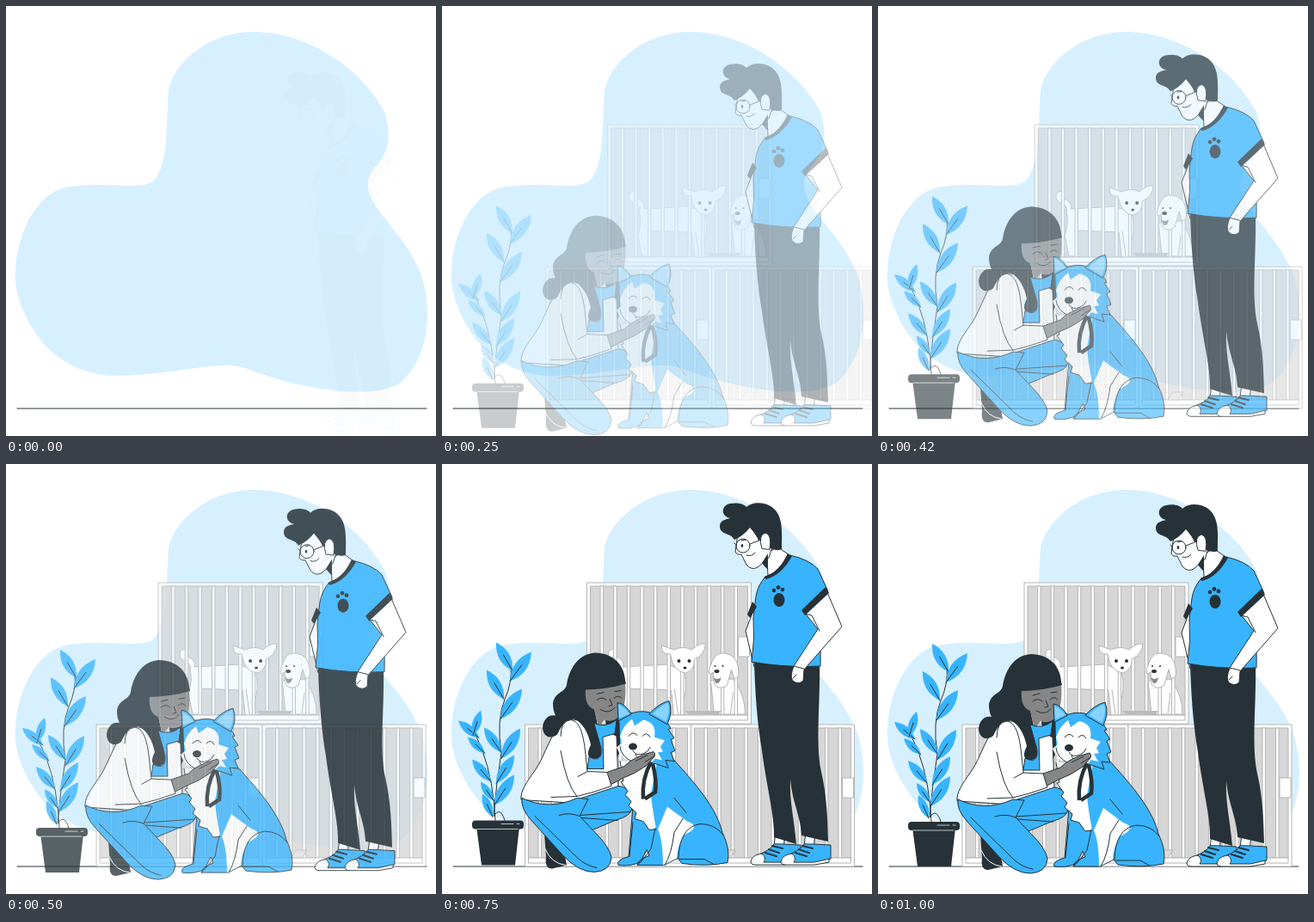
These frames come from a looping animation (500x500 px, 1.04 s). An HTML page:

```html
<!DOCTYPE html>
<html lang="en">
<head>
<meta charset="utf-8">
<title>Dog adoption</title>
<style>
html, body { margin: 0; width: 100%; height: 100%; overflow: hidden; background: #fff; }
svg { display: block; width: 100vw; height: 100vh; }
.ink { stroke: #263238; stroke-width: 1; stroke-linejoin: round; stroke-linecap: round; }
.grey { stroke: #b5b5b5; stroke-width: 1; stroke-linejoin: round; }
.dark { fill: #263238; }
.blue { fill: #38b4ff; }
.pale { fill: #88d2ff; }
.white { fill: #fff; }
.skin { fill: #868686; }
.none { fill: none; }
</style>
</head>
<body>
<svg viewBox="0 0 500 500">
  <path fill="#d7f0ff" d="M189 97C197 62 240 29 291 30C350 31 413 71 441 125C446 146 446 158 441 169C434 187 419 192 421 211C424 238 462 262 482 310C496 350 493 405 462 435C436 460 350 447 291 426C277 421 270 417 252 418C215 420 172 430 128 430C90 430 59 412 40 388C20 362 8 330 11 305C13 270 30 229 58 215C77 206 110 208 140 209C155 209 169 209 175 199C189 177 186 140 189 97Z"/>
  <path class="ink" d="M13 468H489"/>

  <g id="cages">
    <g id="topCage"></g>
    <g id="bottomCages"></g>
  </g>

  <g id="plant">
    <g id="leaves"></g>
    <path class="dark" d="M40 423H90L85 468H46Z"/>
    <rect class="dark" x="35" y="416" width="60" height="10" rx="4"/>
    <path class="none" stroke="#fff" stroke-width=".7" stroke-linecap="round" d="M41 426H88M69 420H83M87 420H90"/>
  </g>

  <g id="man">
    <path class="white ink" d="M363 170L353 196L363 238L376 236V170Z"/>
    <g id="shoe">
      <path class="white ink" d="M388 430L386 446L397 450L399 430Z"/>
      <path class="blue ink" d="M386 444C380 455 363 454 359 465L400 467L417 461L417 445L398 444Z"/>
      <path class="white ink" d="M372 455C364 456 360 459 359 465Q360 468 364 468H398L415 465V461L398 465H374Q378 460 372 455Z"/>
      <path class="none" stroke="#263238" stroke-width="2" stroke-linecap="round" d="M376 454L389 458M380 450L392 454M384 446L396 449"/>
    </g>
    <use href="#shoe" x="35" y="0"/>
    <path class="dark" d="M363 232H439C440 285 434 325 441 360C448 390 448 415 449 441L418 434C417 410 407 395 405 368C404 395 409 410 412 444L386 436C387 412 377 375 372 335C366 300 364 265 363 232Z"/>
    <path class="white ink" d="M378 107L379 132Q390 128 404 108L390 98Z"/>
    <path class="blue ink" d="M376 133Q394 130 405 108Q427 113 437 124L449 150L422 175L437 188Q441 211 440 237Q399 239 360 232Q364 205 362 180L365 156Q367 143 376 133Z"/>
    <path class="white ink" d="M422 175L437 194L409 237Q404 250 408 254Q414 259 420 254L421 241L465 191L447 149Z"/>
    <path class="none ink" d="M409 237L421 240M408 251L412 247"/>
    <path class="dark" d="M374 134L379 131Q392 127 402 106L407 109Q395 131 377 136ZM446 145L450 152L422 178L418 172ZM361 162L366 168L358 181L355 177Z"/>
    <path class="none ink" d="M422 176L430 178L439 196"/>
    <ellipse class="dark" cx="392" cy="160" rx="6.5" ry="8"/>
    <g class="dark"><circle cx="386" cy="149" r="2.300"/><circle cx="391" cy="145.500" r="2.400"/><circle cx="396" cy="148" r="2.400"/></g>
    <path class="white ink" d="M355 70L344 84L341 104Q343 108 348 107L354 119Q360 126 367 122L380 111L385 95L382 72Z"/>
    <path class="dark" d="M340 90C335 81 323 85 323 74C323 67 332 66 335 65C324 63 324 50 335 48C345 46 352 49 354 52C362 44 380 46 388 56C397 67 395 85 395 101C392 103 384 102 380 99L381 86Q374 81 371 90L368 91Q366 85 358 76Q350 86 340 90ZM379 106L379 125Q374 120 372 117Z"/>
    <path class="white ink" d="M372 100Q367 85 376 82Q384 84 381 101Z"/>
    <circle class="none ink" cx="350" cy="97" r="8"/>
    <path class="none ink" d="M358 95L371 90M342 96L340 94M354 108Q360 110 364 105M348 91L353 90"/>
    <ellipse class="dark" cx="349" cy="97" rx="1.300" ry="2"/>
  </g>

  <g id="friends">
    <path class="dark" d="M203 270Q212 280 210 300Q213 325 204 342L196 345L190 300Z"/>
    <path class="white ink" d="M146 298C126 310 121 340 108 358C98 372 91 382 92 392L156 396L205 378L203 318L175 302Z"/>
    <path class="blue ink" d="M150 394L205 376Q221 377 221 402Q220 411 201 416L168 430L150 421Z"/>
    <path class="none ink" d="M160 410L219 406M162 413L204 416"/>
    <path class="dark" d="M119 431Q128 428 141 446L145 468L128 472Q119 472 121 458Z"/>
    <path class="none" stroke="#fff" stroke-width="1" d="M120 449Q127 466 144 468"/>
    <path class="blue ink" d="M93 390Q91 402 104 416L141 457Q159 476 177 476Q196 475 197 459Q195 447 178 430L160 411L170 391L157 390Q124 405 93 390Z"/>
    <path class="none ink" d="M108 411L158 460Q168 469 180 471M160 411Q148 406 136 410"/>
    <path class="dark" d="M213 257C214 235 198 221 178 221C158 222 148 240 145 258C143 268 131 266 129 280Q129 288 132 294C122 292 117 301 117 309C119 322 129 320 134 316Q142 298 154 298Q168 305 173 328Q166 342 175 344Q187 345 185 333L180 300L172 263Z"/>
    <path class="skin" d="M167 262L213 256Q215 281 207 294Q199 303 189 299L182 308L177 287Q165 283 167 262Z"/>
    <path class="dark" d="M165 264Q190 264 214 257L211 245L170 244Z"/>
    <path class="none ink" d="M180 276Q186 271 191 276M200 274Q205 269 209 274M184 287Q194 293 201 285M195 275L198 282L194 283M180 269L188 267M201 266L208 265"/>
    <path class="blue ink" d="M177 303Q190 309 203 299L201 315L187 319L188 356H169L171 342Q187 350 185 332Z"/>

    <path class="blue ink" d="M225 345L263 338C280 358 318 395 326 430C333 445 334 455 332 465Q308 470 279 466L274 460L258 468H227Q228 461 241 457L238 450L231 464Q220 470 205 468Q202 462 217 458L222 400Z"/>
    <path class="white" d="M262 400L285 417Q303 423 281 433Q273 448 273 460L257 468Q257 440 251 426Z"/>
    <path class="white" d="M207 347L211 370L208 371L216 382L213 386L220 394L217 399L226 407L224 414L234 417L241 427L249 426Q244 400 243 385L250 348Z"/>
    <path class="none ink" d="M207 347L211 370L208 371L216 382L213 386L220 394L217 399L226 407L224 414L234 417L241 427L249 426M248 425L243 449Q234 462 227 468M222 418L218 458M259 468Q267 455 270 430L280 414M275 460Q276 424 300 420Q318 420 327 433M276 461H305L316 467M270 390L284 407"/>
    <path class="blue ink" d="M206 296Q214 290 222 291Q234 287 246 292Q260 296 266 309L263 310L270 320L266 322L271 335L266 337L270 347L260 346L263 355L248 350L215 346L207 335Z"/>
    <path class="blue ink" d="M205 300L204 279Q213 280 220 292ZM241 292Q252 280 264 277Q269 290 262 304Z"/>
    <path class="pale" d="M206 297L205 281Q212 284 218 292ZM245 292Q254 282 263 279Q266 290 260 301Z"/>
    <path class="white" d="M203 331L209 326L207 318Q211 305 221 298L224 306L234 299Q250 302 247 319L259 323L254 330L257 336L251 337L256 346L248 344L240 352L222 349Q208 345 203 331Z"/>
    <path class="none ink" d="M217 318Q222 311 227 317M233 318Q238 312 242 319M222 335Q226 342 235 338Q240 336 242 331M207 330Q208 342 222 348M225 339Q227 346 234 345"/>
    <ellipse class="dark" cx="222" cy="330" rx="5" ry="4"/>
    <path class="none" stroke="#263238" stroke-width="4.500" d="M243 348Q232 368 234 391M245 350Q250 370 248 383L236 391"/>

    <path class="skin ink" d="M192 360L212 353Q222 342 246 336Q250 340 244 345L238 352Q224 362 210 367L195 375Z"/>
    <path class="none ink" d="M247 341L236 348M239 340L225 347"/>
    <path class="white ink" d="M138 318Q138 300 150 299C166 302 166 335 169 359L192 360L197 376Q175 384 157 388Q145 375 138 335"/>
    <path class="none ink" d="M158 365L169 359M157 388L127 389"/>
  </g>
</svg>
<script>
const el = id => document.getElementById(id);
const rect = (x, y, w, h, fill = '#fff') =>
  `<rect class="grey" x="${x}" y="${y}" width="${w}" height="${h}" fill="${fill}"/>`;

function cage(x, y, w, h, pets = '', heads = '') {
  let bars = '';
  for (let i = 1; i < 12; i++) bars += rect(x + i * 15.6, y + 4, 3.4, h - 14);
  return rect(x, y, w, h) + rect(x + 4, y + 4, w - 8, h - 14, '#d6d6d6') +
    pets + bars + heads + rect(x + 4, y + h - 10, w - 8, 6);
}
const latch = (x, y) => rect(x, y, 13, 23);

const petBodies = `<g class="grey white">
  <path d="M207 239C210 227 193 232 195 220Q196 214 203 216Q199 222 208 226Q214 231 212 236L263 233L283 240Q288 264 281 277L279 292H271L268 263L218 261L219 291H210L205 267Q210 252 207 239Z"/>
  <path d="M314 252L340 250Q354 268 354 291H318Z"/></g>
  <path class="grey none" d="M272 262L276 291M327 264V288M340 266L337 290"/>`;
const petHeads = `<g class="grey white">
  <path d="M267 221Q256 222 257 211L271 216Q282 211 292 216Q300 208 308 209Q307 222 295 227Q296 239 285 243Q270 242 267 221Z"/>
  <path d="M316 229Q320 219 330 220Q344 222 346 237Q348 251 341 249L338 239L333 257Q324 264 318 256L317 242Q310 248 313 236Z"/></g>
  <g class="dark"><circle cx="277" cy="229" r="2"/><circle cx="289" cy="229" r="2"/>
  <ellipse cx="284" cy="237" rx="2" ry="1.500"/><ellipse cx="321" cy="241" rx="3" ry="2"/>
  <circle cx="319" cy="235" r="1"/><circle cx="328" cy="235" r="1"/></g>
  <path fill="#888" d="M317 248Q322 252 326 248Q325 256 320 255Z"/>
  <path fill="#bbb" d="M284 287H326L323 291H288Z"/>`;

el('topCage').innerHTML = cage(170, 138, 191, 164, petBodies, petHeads) + latch(346, 201);
el('bottomCages').innerHTML = cage(98, 303, 193, 165) + cage(291, 303, 190, 165) +
  latch(274, 365) + latch(467, 365) +
  '<path class="grey" fill="#ddd" d="M325 458L330 449H343L337 458Z"/>';

// Each leaf runs from its base on the stem to its tip.
function leaf([bx, by, tx, ty]) {
  const mx = (bx + tx) / 2, my = (by + ty) / 2;
  const nx = (by - ty) * .33, ny = (tx - bx) * .33;
  return `<path class="blue" d="M${bx} ${by}Q${mx + nx} ${my + ny} ${tx} ${ty}Q${mx - nx} ${my - ny} ${bx} ${by}Z"/>
    <path class="ink" d="M${bx} ${by}L${bx + (tx - bx) * .55} ${by + (ty - by) * .55}"/>`;
}
const leaves = [
  [82, 242, 63, 209], [79, 254, 104, 220], [72, 275, 52, 241], [68, 298, 93, 263],
  [69, 337, 49, 308], [69, 344, 91, 309], [63, 373, 84, 340], [61, 398, 84, 363],
  [43, 320, 19, 300], [36, 317, 45, 288], [50, 338, 30, 319],
  [57, 371, 35, 345], [60, 393, 45, 371], [59, 412, 47, 385]
];
el('leaves').innerHTML =
  `<path class="ink none" d="M73 416Q68 399 60 411Q63 375 69 337Q63 300 73 275Q82 255 80 236M62 416Q60 370 47 335Q42 321 36 313"/>` +
  leaves.map(leaf).join('');

// Back-out easing: cubic-bezier(.36, -.01, .5, 1.38)
function ease(x) {
  if (x <= 0) return 0;
  if (x >= 1) return 1;
  const bez = (s, a, b) => 3 * (1 - s) ** 2 * s * a + 3 * (1 - s) * s * s * b + s ** 3;
  let lo = 0, hi = 1;
  for (let i = 0; i < 24; i++) {
    const mid = (lo + hi) / 2;
    if (bez(mid, .36, .5) < x) lo = mid; else hi = mid;
  }
  return bez(lo, -.01, 1.38);
}

const LOOP = 1040, STEP = 1000 / 24, SLIDE = 30;
const parts = [
  { id: 'cages', lead: 10, dx: SLIDE, dy: 0 },
  { id: 'plant', lead: 10, dx: 0, dy: SLIDE },
  { id: 'man', lead: 56, dx: 0, dy: SLIDE },
  { id: 'friends', lead: 10, dx: 0, dy: SLIDE }
].map(p => ({ ...p, node: el(p.id) }));

// Motion advances at 24 steps per second; the first pose is held for two.
function render(ms) {
  const step = Math.floor((ms % LOOP + 4) / STEP);
  const time = step < 2 ? 0 : Math.min(step, 24) * STEP;
  for (const { node, lead, dx, dy } of parts) {
    const p = ease((time + lead) / 1000);
    node.setAttribute('transform', `translate(${dx * (1 - p)} ${dy * (1 - p)})`);
    node.setAttribute('opacity', Math.max(0, Math.min(1, p)));
  }
}

const start = performance.now();
function tick() {
  render(performance.now() - start);
  requestAnimationFrame(tick);
}
tick();
</script>
</body>
</html>
```
